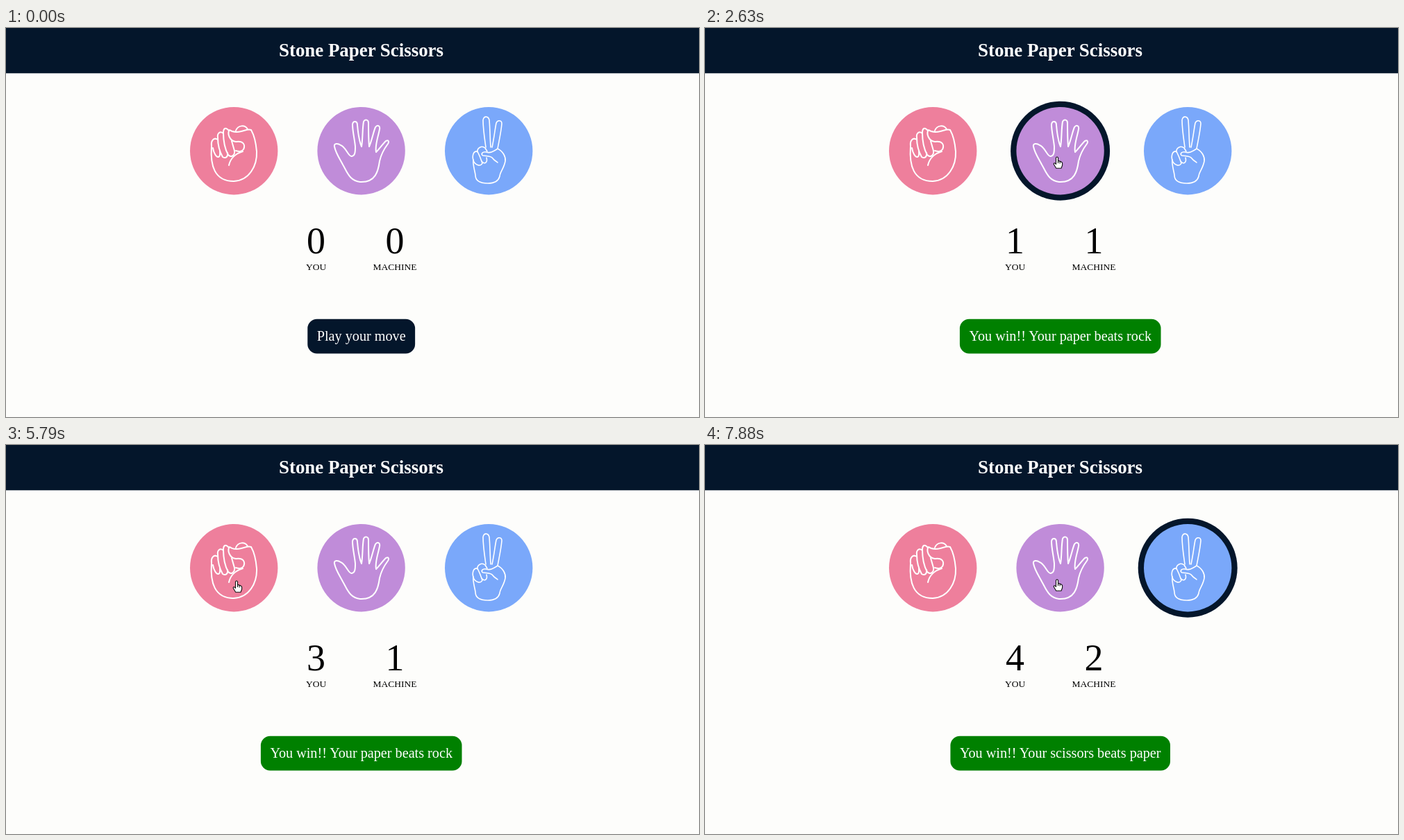
Write an HTML page that moves like this. It is 998 px wide and 561 px high and loops after 8000 ms.

```html
<!DOCTYPE html>
<html lang="en">
<head>
<meta charset="utf-8">
<title>Stone Paper Scissors</title>
<style>
  html, body { margin: 0; width: 100%; height: 100%; overflow: hidden; background: #fdfdfb; }
  svg { display: block; font-family: "Liberation Serif", "Times New Roman", serif; text-anchor: middle; }
  .hand { fill: none; stroke: #fff; stroke-width: 2; stroke-linecap: round; stroke-linejoin: round; }
  .thin { stroke-width: 1.6; }
  .title { font-size: 26.9px; font-weight: bold; fill: #fff; }
  .score { font-size: 53.9px; }
  .label { font-size: 13.47px; }
  .message { font-size: 20.2px; fill: #fff; }
</style>
</head>
<body>
<svg width="998" height="561" viewBox="0 0 998 561">
  <rect width="998" height="65.3" fill="#04162b"/>
  <text class="title" x="511.5" y="40.5">Stone Paper Scissors</text>

  <g fill="#04162b">
    <circle class="ring" cx="328.2" cy="177.2" r="71.5"/>
    <circle class="ring" cx="511.6" cy="177.2" r="71.5"/>
    <circle class="ring" cx="695.2" cy="177.2" r="71.5"/>
  </g>
  <circle cx="328.2" cy="177.2" r="63.2" fill="#ee7f9c"/>
  <circle cx="511.6" cy="177.2" r="63.2" fill="#c08cd9"/>
  <circle cx="695.2" cy="177.2" r="63.2" fill="#7aa8fa"/>

  <g class="hand">
    <path d="M296 171C294 198 300 221 328 221C350 220 362 199 361 178C360 166 357 154 353 147C349 145 344 148 339 149C332 151 326 150 322 147C318 152 322 163 331 164C342 162 345 169 342 175C339 179 335 178 331 177M341 178C331 181 323 188 321 198"/>
    <path d="M331 148C334 140 344 139 348 146M321 148C316 142 313 145 313 151C313 160 315 174 320 183C325 188 330 183 329 177L325 163"/>
    <path d="M313 152C308 148 304 152 305 158C305 168 308 179 312 186C317 189 320 185 319 180M305 161C299 157 295 163 296 170M298 173C299 180 303 187 306 186C309 185 308 181 308 178"/>
  </g>

  <path class="hand" d="M473 171C472 166 478 166 482 169C490 172 493 186 498 185C503 184 503 178 503 171C502 160 499 149 499 139C500 133 506 134 506 140C507 152 509 164 512 171C514 160 513 146 515 135C517 131 522 132 522 137C522 149 522 160 523 171C527 162 529 150 532 143C535 139 539 141 538 146C536 157 531 169 533 179C537 175 542 168 547 163C551 161 552 164 550 167C544 175 540 183 538 192C536 207 532 222 512 222C495 222 491 207 485 197C481 189 475 181 473 171Z"/>

  <g class="hand thin">
    <path d="M691 172C689 158 687 145 687 133C688 126 695 127 696 133C697 145 697 158 698 172"/>
    <path d="M700 172C703 158 704 147 706 137C708 132 714 133 714 138C713 150 710 163 708 174C716 178 720 186 719 192C717 203 711 208 711 214C709 221 704 224 694 224C684 224 676 221 676 212C675 205 672 197 673 190"/>
    <path d="M708 174C702 178 697 181 692 179C686 178 683 182 687 184C693 185 698 184 701 188C703 191 706 192 708 194"/>
    <path d="M673 191C671 184 673 177 679 178C682 184 685 192 686 195C683 201 675 197 673 191M679 179C678 173 685 169 690 173L693 178M684 190C688 198 694 195 692 187"/>
  </g>

  <text class="score" id="you" x="446.5" y="324.5"></text>
  <text class="score" id="machine" x="560" y="324.5"></text>
  <text class="label" x="446.7" y="349.3">YOU</text>
  <text class="label" x="560" y="349.3">MACHINE</text>

  <rect id="box" y="419.8" height="49.6" rx="13.5"/>
  <text class="message" id="message" x="511.7" y="451.2"></text>

  <path id="cursor" fill="#fff" stroke="#111" stroke-width="1.1" stroke-linejoin="round"
    d="M-1.5 1Q0 -1 1.5 1V6Q3 5 4.1 6.6Q5.7 5.8 6.2 7.6Q7.6 7.3 7.6 9V12L6 16.2H-1.3L-4.6 10.8Q-5.2 8.4 -3.2 8.8L-1.5 10.4ZM1.5 6V9M4.1 6.6V9.4"/>
</svg>
<script>
const LOOP = 8000;
const $ = id => document.getElementById(id);

// start, end, x, y: travel to the point, then rest there
const moves = [
  [90, 90, 687, 119], [90, 290, 304, 189], [500, 700, 328, 190],
  [1500, 1545, 507, 186], [3000, 3000, 657, 186], [4500, 4750, 467, 194],
  [5500, 5500, 420, 196], [5790, 5790, 332, 196], [6880, 6880, 665, 190],
  [7460, 7590, 545, 200], [7790, 7880, 507, 194]
];

// time, hovered choice (-1: none)
const hovers = [
  [0, -1], [500, 0], [1545, 1], [3000, -1], [3210, 2], [4540, -1],
  [4700, 1], [5500, -1], [5840, 0], [6880, -1], [6960, 2]
];

const WIN = "#008000", LOSS = "#ff0000";
// time, you, machine, colour, message
const rounds = [
  [0, 0, 0, "#04162b", "Play your move"],
  [800, 0, 1, LOSS, "You lost!! paper beats your rock"],
  [2100, 1, 1, WIN, "You win!! Your paper beats rock"],
  [3460, 2, 1, WIN, "You win!! Your scissors beats paper"],
  [5080, 3, 1, WIN, "You win!! Your paper beats rock"],
  [6080, 3, 2, LOSS, "You lost!! paper beats your rock"],
  [7380, 4, 2, WIN, "You win!! Your scissors beats paper"]
];

const rings = document.querySelectorAll(".ring");
const latest = (table, t) => table.filter(row => row[0] <= t).pop();

function cursorAt(t) {
  let x = 0, y = 0;
  for (const [start, end, toX, toY] of moves) {
    if (t < start) break;
    const p = end > start ? Math.min(1, (t - start) / (end - start)) : 1;
    x += (toX - x) * p;
    y += (toY - y) * p;
  }
  return [x, y];
}

let shown;
function showRound(round) {
  if (round === shown) return;
  shown = round;
  const [, you, machine, colour, message] = round;
  $("you").textContent = you;
  $("machine").textContent = machine;
  $("message").textContent = message;
  const width = $("message").getComputedTextLength() + 27;
  $("box").setAttribute("width", width);
  $("box").setAttribute("x", 511.7 - width / 2);
  $("box").setAttribute("fill", colour);
}

function draw() {
  const t = performance.now() % LOOP;
  showRound(latest(rounds, t));
  const hovered = latest(hovers, t)[1];
  rings.forEach((ring, i) => ring.style.visibility = i === hovered ? "visible" : "hidden");
  $("cursor").style.visibility = t < moves[0][0] ? "hidden" : "visible";
  $("cursor").setAttribute("transform", `translate(${cursorAt(t)})`);
  requestAnimationFrame(draw);
}
draw();
</script>
</body>
</html>
```
